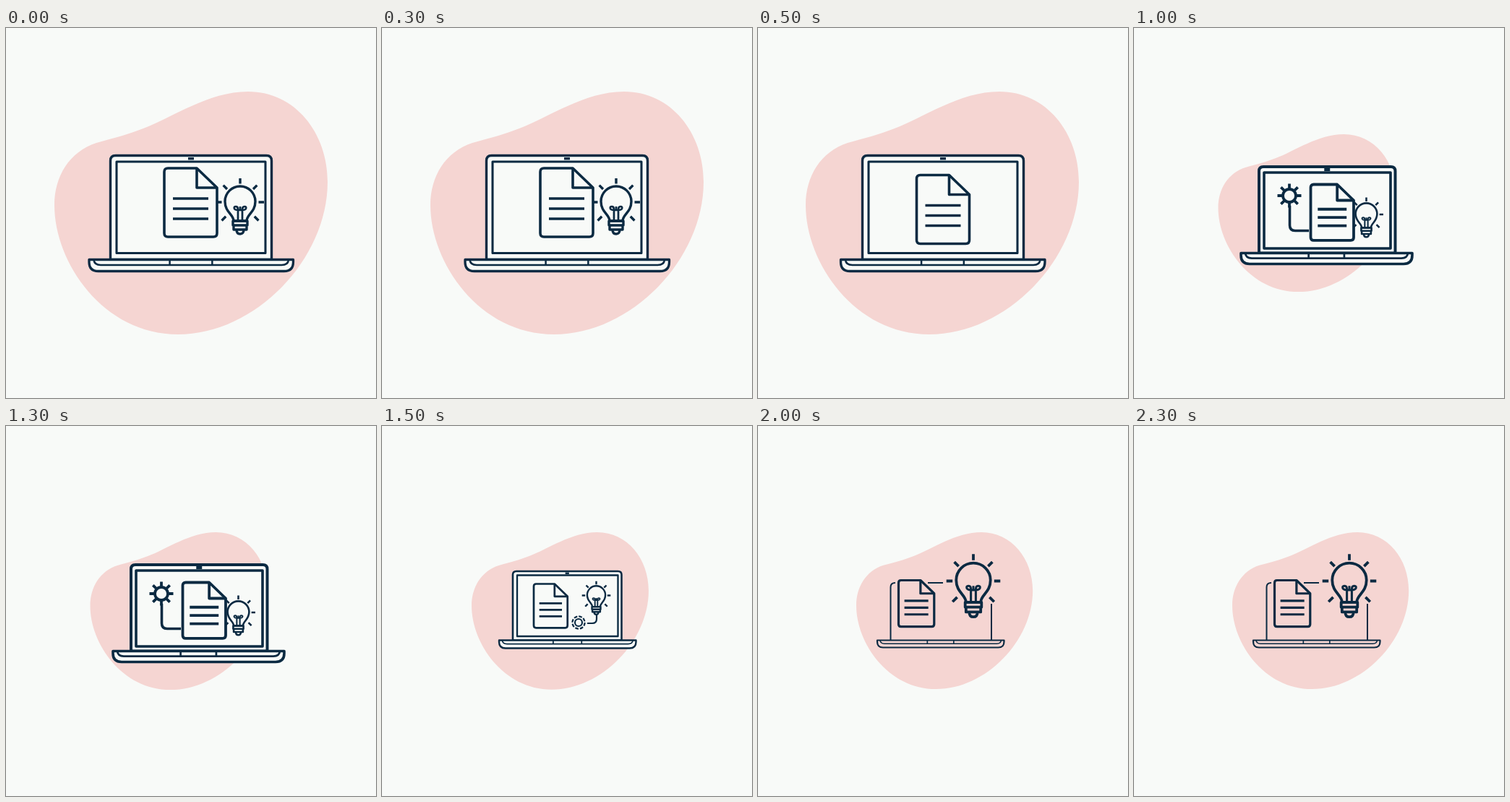
Write an HTML page that moves like this. It is 512 px wide and 512 px high and loops after 2500 ms.

```html
<!DOCTYPE html>
<html lang="en">
<head>
<meta charset="utf-8">
<title>Document and idea on a laptop</title>
<style>
  html, body { margin: 0; width: 100%; height: 100%; overflow: hidden; background: #f8faf8; }
  svg { display: block; width: 100vw; height: 100vh; }
  .scene {
    opacity: 0;
    animation: show 2.5s step-end infinite;
    animation-delay: calc(var(--i) * .5s - 2.5s);
  }
  @keyframes show {
    0% { opacity: 1; }
    20%, 100% { opacity: 0; }
  }
  .ink { fill: none; stroke: #0b2a42; stroke-linecap: butt; stroke-linejoin: round; }
  .ink * { vector-effect: non-scaling-stroke; }
  .paper { fill: #f8faf8; }
  .blob { fill: #f5d5d2; }
</style>
</head>
<body>
<svg id="stage" viewBox="0 0 512 512" xmlns="http://www.w3.org/2000/svg"></svg>
<script>
const path = (d, cls = '') => `<path class="${cls}" d="${d}"/>`;
const ink = (width, body, at = '') => `<g class="ink" stroke-width="${width}" transform="${at}">${body}</g>`;
const place = (x, y, s) => `translate(${x} ${y}) scale(${s})`;

const blob = (x, y, s) => `<path class="blob" transform="${place(x, y, s)}" d="M268 0
  C333 0 378 57 378 125 C378 232 278 336 171 336 C68 336 0 237 0 157
  C0 117 21 83 58 71 C83 64 103 59 123 51 C163 36 213 0 268 0Z"/>`;

// Laptop foot: a tray with an inner rim and two notches
function foot(x0, x1, y, h, width, cls) {
  const w = x1 - x0, r = h * .8, rim = y + h * .47, b = y + h;
  const notch = f => `M${x0 + w * f} ${y}V${rim}`;
  return ink(width, path(`M${x0} ${y}H${x1}V${b - r}Q${x1} ${b} ${x1 - r} ${b}H${x0 + r}Q${x0} ${b} ${x0} ${b - r}Z`, cls))
    + ink(width * .75, path(`M${x0 + h * .4} ${y}Q${x0 + h * .45} ${rim} ${x0 + h} ${rim}H${x1 - h}Q${x1 - h * .45} ${rim} ${x1 - h * .4} ${y}`
    + notch(.395) + notch(.603)));
}

function lid([x0, y0, x1, y1], [a0, b0, a1, b1], cam, width) {
  const r = (x1 - x0) * .032, cx = (x0 + x1) / 2, cy = (y0 + b0) / 2;
  return ink(width, path(`M${x0} ${y1}V${y0 + r}Q${x0} ${y0} ${x0 + r} ${y0}H${x1 - r}Q${x1} ${y0} ${x1} ${y0 + r}V${y1}Z`, 'paper')
    + path(`M${cx - cam} ${cy}H${cx + cam}`))
    + ink(width * .9, path(`M${a0} ${b0}H${a1}V${b1}H${a0}Z`));
}

const sheet = (x, y, s, width, cls = 'paper') => ink(width,
  path('M5 0H45L73 27V90Q73 95 68 95H5Q0 95 0 90V5Q0 0 5 0Z', cls)
  + path('M45 0V27H73M12 42H61M12 56H61M12 70H61'), place(x, y, s));

// Bulb centred on its glass, with seven rays
function bulb(x, y, s, width, cls = 'paper') {
  let rays = '';
  for (let k = 0; k < 7; k++) {
    const a = (135 + k * 45) * Math.PI / 180, c = Math.cos(a), n = Math.sin(a);
    const near = k % 6 ? 25.5 : 28, far = k % 6 ? 33 : 36;
    rays += `M${c * near} ${n * near}L${c * far} ${n * far}`;
  }
  return ink(width,
    path('M-9 26C-9 17 -21 14 -21 -1A21 21 0 0 1 21 -1C21 14 9 17 9 26Z', cls)
    + path('M-10 26H10V32H-10ZM-9 32H9V38H-9ZM-5 38Q-5 44 0 44Q5 44 5 38')
    + path(rays), place(x, y, s))
    + ink(width * .8, path('M-3 26V10Q-3 6 -6 6Q-9 6 -8 9Q-7 11 -3 11H3Q7 11 8 9Q9 6 6 6Q3 6 3 10V26M0 11V6'), place(x, y, s));
}

function sunGear(x, y) {
  let teeth = '';
  for (let k = 0; k < 8; k++) {
    const a = k * Math.PI / 4, c = Math.cos(a), n = Math.sin(a);
    teeth += `M${c * 10} ${n * 10}L${c * 16.5} ${n * 16.5}`;
  }
  return ink(3.8, `<circle r="9"/>` + path(teeth), place(x, y, 1));
}

const dashGear = (x, y) => ink(2.2,
  `<circle r="8.6" stroke-dasharray="4.75 2"/><circle r="5"/>`, place(x, y, 1));

const scenes = [
  blob(67, 88, 1)
    + lid([144.5, 176.5, 367.5, 320.5], [153, 185, 359, 311.5], 4, 3.4)
    + foot(115, 397.5, 320.5, 16, 3.3, 'paper')
    + bulb(324, 241, 1, 3.4) + sheet(219, 194, 1, 3.6),

  blob(66, 88, 1)
    + lid([144.5, 176.5, 367.5, 320.5], [153, 185, 359, 311.5], 4, 3.4)
    + foot(114.5, 397, 320.5, 16, 3.3, 'paper')
    + sheet(219.5, 203.5, 1, 3.6),

  blob(116.5, 147, .649)
    + lid([173, 192, 361.5, 311.5], [180, 200, 355, 305], 4, 4)
    + foot(148, 385, 311.5, 15, 3.6, 'paper')
    + ink(3.6, path('M215.5 246V273Q215.5 280.5 223 280.5H242'))
    + sunGear(215, 232)
    + bulb(321.5, 258, .71, 2.6) + sheet(244.5, 216.5, .815, 3.8),

  blob(124, 147, .648)
    + lid([181, 201, 331.5, 296.5], [187, 206.5, 326.5, 291], 2.6, 2.6)
    + foot(162, 351.5, 296.5, 11, 2.4, 'paper')
    + ink(2.2, path('M297 261V267Q297 273 291 273H284'))
    + dashGear(272, 272)
    + bulb(296.5, 234.5, .6, 2.4) + sheet(210, 218.5, .64, 2.7),

  blob(136, 147, .646)
    + ink(2, path('M183.5 296V223Q183.5 217 190 217M235 217H256M323 246V296'))
    + foot(165, 340.5, 296.5, 10, 2.2)
    + bulb(298, 214.5, 1.13, 3.8, '') + sheet(194.5, 213.5, .675, 3.2, '')
];

document.getElementById('stage').innerHTML = scenes
  .map((body, i) => `<g class="scene" style="--i:${i}">${body}</g>`).join('');
</script>
</body>
</html>
```
